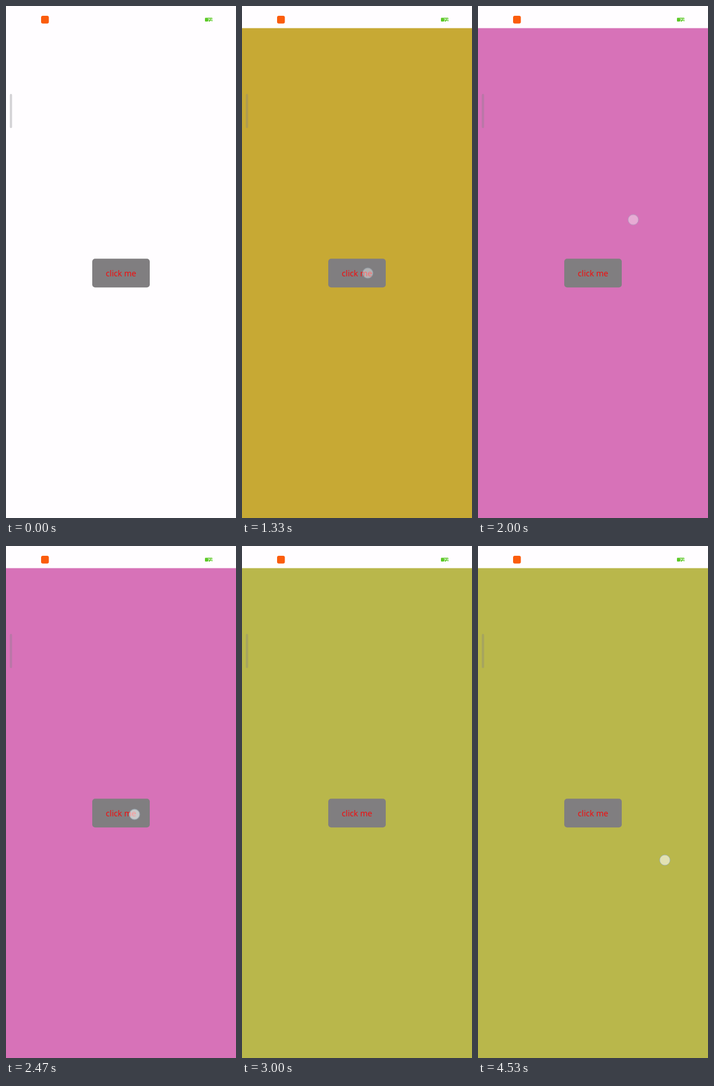
These frames come from a looping animation (400 px wide and 890 px high, 4.6 s). An HTML page:

```html
<!DOCTYPE html>
<html lang="en">
<head>
<meta charset="utf-8">
<title>Click me</title>
<style>
  html, body { margin: 0; width: 100%; height: 100%; overflow: hidden; background: #fffdff; }
  svg { display: block; width: 100%; height: 100%; }
  .label { font: 14px "Noto Sans", sans-serif; fill: #f20d0d; text-anchor: middle; }
  .charge { font: italic bold 7.5px Roboto, sans-serif; fill: #fff; }
</style>
</head>
<body>
<svg viewBox="0 0 400 890">
  <rect id="page" y="38.5" width="400" height="851.5" fill="#fffdff"/>

  <rect x="61" y="17" width="13.5" height="13.5" rx="3" fill="#fb5c0c"/>
  <rect x="346" y="20.5" width="13" height="6.5" rx="1" fill="#5cc927"/>
  <text class="charge" x="350.5" y="26.7">72</text>

  <rect x="6.7" y="152.8" width="3.8" height="59.4" rx="1.9" fill="#808088" fill-opacity=".35"/>

  <rect x="150" y="439.3" width="100" height="50" rx="5" fill="#807e80"/>
  <text class="label" x="200" y="469.6">click me</text>

  <circle id="touch" r="9" fill="#fff" fill-opacity=".58" stroke="#96afbe" stroke-opacity=".8" opacity="0"/>
</svg>
<script>
  const LOOP = 4600;
  const page = document.getElementById('page');
  const touch = document.getElementById('touch');

  // Each tap: time, position, and the page colour it triggers.
  const taps = [
    { at: 1270, x: 218.7, y: 464.2, color: '#c7a934' },
    { at: 1930, x: 270, y: 371.5, color: '#d772b8' },
    { at: 2470, x: 223.5, y: 466.5, color: '#b9b74b' },
    { at: 4530, x: 325, y: 546 }
  ];
  const REACTION = 60;
  const FADE = [[0, 1], [60, .7], [130, .3], [190, 0]];

  // Plays [time, style] steps as hard changes, holding the last one to the loop's end.
  function playSteps(element, steps) {
    const frames = steps.map(([time, style]) =>
      ({ ...style, offset: time / LOOP, easing: 'step-end' }));
    frames.push({ ...steps.at(-1)[1], offset: 1 });
    element.animate(frames, { duration: LOOP, iterations: Infinity });
  }

  const colorSteps = [[0, { fill: '#fffdff' }]];
  const touchSteps = [[0, { opacity: 0, transform: 'translate(0px, 0px)' }]];

  for (const { at, x, y, color } of taps) {
    if (color) colorSteps.push([at + REACTION, { fill: color }]);
    for (const [delay, opacity] of FADE) {
      if (at + delay < LOOP - 10) {
        touchSteps.push([at + delay, { opacity, transform: `translate(${x}px, ${y}px)` }]);
      }
    }
  }

  playSteps(page, colorSteps);
  playSteps(touch, touchSteps);
</script>
</body>
</html>
```
